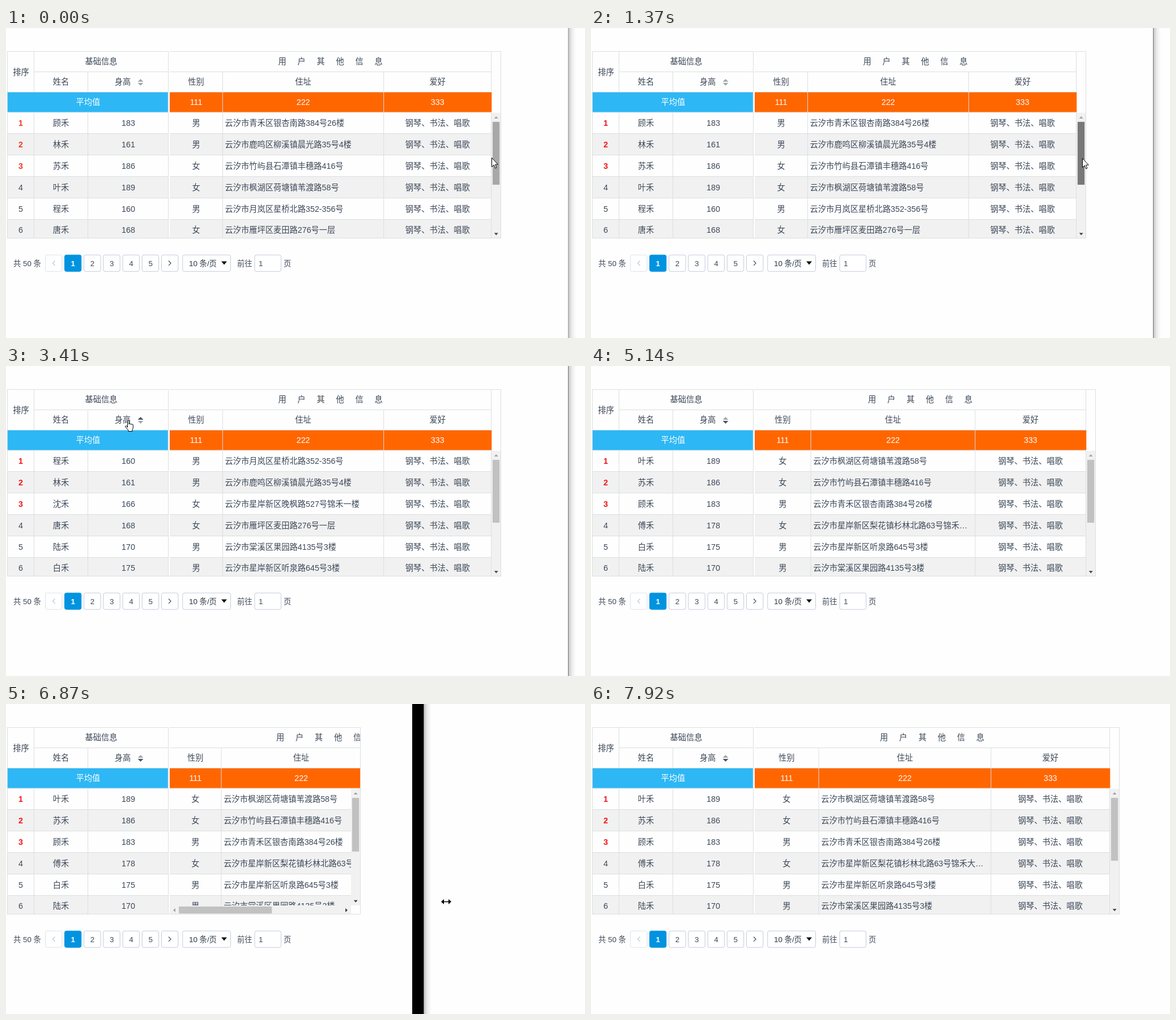
Write an HTML page that moves like this. It is 1022 px wide and 548 px high and loops after 8000 ms.

```html
<!DOCTYPE html>
<html lang="zh-CN">
<head>
<meta charset="utf-8">
<title>表格</title>
<style>
  html, body { margin: 0; width: 100%; height: 100%; overflow: hidden; background: #fefefe; }
  svg { display: block; width: 1022px; height: 548px; }
  text {
    font: 14.25px "Liberation Sans", "Noto Sans CJK SC", "Noto Sans CJK", sans-serif;
    fill: #3c4858; white-space: pre;
  }
  .s { font-size: 13.35px; }
  .w { fill: #fff; }
  .b { font-weight: bold; }
</style>
</head>
<body>
<svg id="stage" viewBox="0 0 1022 548" xmlns="http://www.w3.org/2000/svg"></svg>
<script>
const LOOP = 8000, TOP = 149.5, ROW = 37.8, LEFT = 289, MAX_SCROLL = 155.5, BAR = 16.1;
const BASE = [91.5, 282, 187.5], MIN = 561;
const LINE = '#dcdedf', EM = 14.25;
const HOBBY = '钢琴、书法、唱歌';

const people = [
  ['顾禾', 183, '男', '云汐市青禾区银杏南路384号26楼'],
  ['林禾', 161, '男', '云汐市鹿鸣区柳溪镇晨光路35号4楼'],
  ['苏禾', 186, '女', '云汐市竹屿县石潭镇丰穗路416号'],
  ['叶禾', 189, '女', '云汐市枫湖区荷塘镇苇渡路58号'],
  ['程禾', 160, '男', '云汐市月岚区星桥北路352-356号'],
  ['唐禾', 168, '女', '云汐市雁坪区麦田路276号一层'],
  ['陆禾', 170, '男', '云汐市棠溪区果园路4135号3楼'],
  ['傅禾', 178, '女', '云汐市星岸新区梨花镇杉林北路63号锦禾大厦一楼'],
  ['沈禾', 166, '女', '云汐市星岸新区晚枫路527号锦禾一楼'],
  ['白禾', 175, '男', '云汐市星岸新区听泉路645号3楼']
];

// Each step lists only what changes. cur: kind, x, y; win: content edge, frame edge
const steps = [
  { t: 0, cur: ['arrow', 857, 229], scroll: 0, thumb: '#a8a8a8', order: 0, right: 874, win: [993, 993], line: '#9c9c9c', red: '#f4361a' },
  { t: 330, cur: ['arrow', 862, 285], scroll: 85, thumb: '#787878', line: '#747474' },
  { t: 680, cur: ['arrow', 865, 340], scroll: MAX_SCROLL },
  { t: 1010, cur: ['arrow', 868, 297] },
  { t: 1370, cur: ['arrow', 867, 230], scroll: 0, red: '#f5121a' },
  { t: 1700, cur: ['arrow', 846, 243], thumb: '#c1c1c1' },
  { t: 2050, cur: ['arrow', 253, 126] },
  { t: 2380, cur: ['hand', 219, 97] },
  { t: 2740, cur: ['hand', 227, 90], order: 1 },
  { t: 3080, cur: ['arrow', 212, 125] },
  { t: 3410, cur: ['hand', 210, 96] },
  { t: 3760, cur: ['hand', 233, 90], order: -1 },
  { t: 4100, cur: ['arrow', 973, 327] },
  { t: 4450, cur: ['arrow', 1002, 334] },
  { t: 4800, cur: ['arrow', 988, 328] },
  { t: 5140, cur: null, right: 891, win: null },
  { t: 5520, right: 935 },
  { t: 5840, cur: ['resize', 941, 345], right: 891, win: [976, 976] },
  { t: 6190, cur: ['resize', 781, 345], right: 711, win: [815, 815] },
  { t: 6540, cur: ['resize', 681, 345], right: 611, win: [700, 700] },
  { t: 6870, cur: ['resize', 768, 345], right: 626, win: [717, 738] },
  { t: 7210, cur: ['resize', 921, 345], right: 760, win: [870, 891] },
  { t: 7570, cur: null, right: 909, win: null },
  { t: 7920, right: 933 }
];
const states = [];
steps.forEach(s => states.push({ ...states[states.length - 1], ...s }));

const rect = (x, y, w, h, fill, more = '') =>
  `<rect x="${x}" y="${y}" width="${Math.max(w, 0)}" height="${h}" fill="${fill}" ${more}/>`;
const hline = (x1, x2, y) => rect(x1, y, x2 - x1, 1, LINE);
const vline = (x, y1, y2) => rect(x, y1, 1, y2 - y1, LINE);
const path = (d, fill, more = '') => `<path d="${d}" fill="${fill}" ${more}/>`;
const text = (x, y, str, cls = '', anchor = 'middle', more = '') =>
  `<text x="${x}" y="${y + 5.2}" class="${cls}" text-anchor="${anchor}" ${more}>${str}</text>`;
const clip = (id, x, y, w, h, inner) =>
  `<clipPath id="${id}"><rect x="${x}" y="${y}" width="${w}" height="${h}"/></clipPath><g clip-path="url(#${id})">${inner}</g>`;

// Triangle with its flat side w wide and its tip h away, turned by deg
const tri = (x, y, w, h, deg, fill) =>
  path(`M${-w / 2} ${h / 2}H${w / 2}L0 ${-h / 2}Z`, fill, `transform="translate(${x} ${y}) rotate(${deg})"`);

const charWidth = c => c > '\u00ff' ? EM : c === '-' ? EM * .333 : EM * .556;
const width = str => [...str].reduce((sum, c) => sum + charWidth(c), 0);
function fit(str, room) {
  if (width(str) <= room) return str;
  while (width(str) + EM > room) str = str.slice(0, -1);
  return str + '…';
}

function layout(right) {
  const extra = Math.max(0, right - 17 - LEFT - MIN) / 3;
  const w = BASE.map(b => b + extra);
  const x = [LEFT];
  w.forEach((v, i) => x.push(x[i] + v));
  return { x, w, mid: w.map((v, i) => x[i] + v / 2 - .4), narrow: right < 867 };
}

// Summary cells sit inside the grid lines
const band = (x1, x2, fill) => rect(x1, 113.7, x2 - x1, 34.9, fill);

function leftHead(order) {
  const caret = on => on ? '#48576a' : '#a3a8ae';
  return hline(2, 287, 41) + hline(49, 287, 77) + hline(2, 287, 113) + hline(2, 287, 148.6)
    + vline(2, 41, 149) + vline(49, 41, 113) + vline(144, 77, 113) + vline(286, 41, 149)
    + text(26.5, 77.3, '排序') + text(168, 59, '基础信息') + text(97, 95, '姓名') + text(206, 95, '身高')
    + tri(237.5, 92.5, 10, 5, 0, caret(order > 0)) + tri(237.5, 99.5, 10, 5, 180, caret(order < 0))
    + band(2.8, 285.8, '#2db7f5') + text(145, 131, '平均值', 'w');
}

function rightHead(L, right) {
  const end = L.x[3];
  let out = hline(LEFT, right, 41) + hline(LEFT, end, 77) + hline(LEFT, end, 113) + hline(LEFT, end, 148.6)
    + vline(end - 1, 41, 113);
  [...'用户其他信息'].forEach((c, i) => out += text((LEFT + end) / 2 - .4 + (i - 2.5) * 34, 59, c));
  out += band(LEFT, end + .3, '#ff6600');
  ['性别', '住址', '爱好'].forEach((s, i) => {
    out += text(L.mid[i], 95, s) + text(L.mid[i], 131, String(i + 1).repeat(3), 'w');
    if (i < 2) out += vline(L.x[i + 1] - 1, 77, 149);
  });
  return out;
}

function body(s, L) {
  const rows = [...people];
  if (s.order) rows.sort((a, b) => s.order * (a[1] - b[1]));
  let left = '', main = '';
  const end = L.x[3];
  rows.forEach(([name, height, sex, home], i) => {
    const y = TOP + i * ROW - s.scroll, y0 = Math.round(y), h = Math.round(y + ROW) - y0;
    const mid = y + ROW / 2 - .2, fill = i % 2 ? '#f1f1f1' : '#fefefe';
    left += rect(3, y0, 283, h, fill) + hline(2, 286, y0 + h - 1)
      + text(26, mid, i + 1, i < 3 ? 'b' : '', 'middle', i < 3 ? `style="fill:${s.red}"` : '')
      + text(97, mid, name) + text(216, mid, height);
    main += rect(LEFT, y0, end - LEFT, h, fill) + hline(LEFT, end, y0 + h - 1)
      + text(L.mid[0], mid, sex)
      + text(L.x[1] + 3.7, mid, fit(home, L.w[1] - 8), '', 'start')
      + text(L.mid[2], mid, HOBBY);
  });
  [2, 49, 144, 286].forEach(x => left += vline(x, 149, 371));
  [1, 2, 3].forEach(i => main += vline(L.x[i] - 1, 149, 371));
  const bottom = L.narrow ? 356 : 371;
  return clip('cl', 2, 150, 285, 221, left)
    + clip('cm', LEFT, 150, s.right - 17 - LEFT, bottom - 150, main);
}

function bars(s, L) {
  const x = s.right - 17, top = 149.8, bottom = L.narrow ? 356 : 371.5, view = bottom - top;
  const track = view - 2 * BAR, size = track * view / 378;
  const pos = top + BAR + (track - size) * s.scroll / MAX_SCROLL;
  const tone = off => off ? '#a3a3a3' : '#404040';
  let out = rect(x, top, BAR, view, '#f1f1f1')
    + rect(x + 1.9, pos, 12.3, size, s.thumb)
    + tri(x + 8.2, 158, 7, 4, 0, tone(s.scroll === 0))
    + tri(x + 8.2, bottom - 7.3, 7, 4, 180, tone(s.scroll === MAX_SCROLL));
  if (L.narrow) {
    const w = x - LEFT;
    out += rect(LEFT, 356, w, 15, '#f1f1f1') + rect(x, 356, BAR, 15, '#fefefe')
      + rect(LEFT + BAR, 358, (w - 2 * BAR) * w / MIN, 12.3, '#c1c1c1')
      + tri(LEFT + 8, 364.5, 7, 4, -90, tone(true)) + tri(x - 8, 364.5, 7, 4, 90, tone(false));
  }
  return out;
}

function pager() {
  const box = (x, w, stroke = '#c3ccda', fill = '#fff') =>
    rect(x + .5, 401.2, w - 1, 29.1, fill, `rx="3" stroke="${stroke}"`);
  const chevron = (x, d, stroke) =>
    path(`M${x - 2 * d} 411.5l${4 * d} 4.2l${-4 * d} 4.2`, 'none', `stroke="${stroke}" stroke-width="1.3"`);
  let out = text(13, 415.5, '共 50 条', 's', 'start')
    + box(69, 30.3, '#dce2ea') + chevron(84.5, -1, '#c3c9d1')
    + box(274, 30.3) + chevron(289, 1, '#48576a');
  for (let i = 0; i < 5; i++) {
    const x = 103 + i * 34.2;
    out += i ? box(x, 30.3) : box(x, 30.3, '#0093e0', '#0093e0');
    out += text(x + 15.3, 416, i + 1, i ? 's' : 's b w');
  }
  return out + box(311.3, 85.7) + text(323, 416, '10 条/页', 's', 'start', 'style="fill:#2c3846"')
    + tri(385, 415.5, 10, 6, 180, '#111')
    + text(408, 415.5, '前往', 's', 'start') + box(438.5, 47.5) + text(446, 416, '1', 's', 'start')
    + text(490, 415.5, '页', 's', 'start');
}

const shapes = {
  arrow: path('M.5.5V16.5L4.2 13L6.7 18.9L9 17.9L6.6 12.2H11.3Z', '#fff', 'stroke="#000"'),
  hand: path('M4.5 12.5V1.8q0-1.3 1.3-1.3t1.3 1.3V7q0-1 1.2-1t1.3 1.2q.2-.8 1.2-.8t1.2 1.2q.3-.7 1.1-.7 1.2 0 1.2 1.5V13q0 2-1.5 4v2.5H6V17.5L1 12q-.8-1.2.2-1.9t2 .2Z', '#fff', 'stroke="#000"'),
  resize: path('M0 4.5L5 0V3.7H13V0L18 4.5L13 9V5.3H5V9Z', '#000')
};
const cursor = c => c ? `<g transform="translate(${c[1]} ${c[2]})">${shapes[c[0]]}</g>` : '';

function frame(s) {
  if (!s.win) return '';
  const [inner, outer] = s.win;
  return `<linearGradient id="sh"><stop offset="0" stop-color="#c6c6c6"/><stop offset=".45" stop-color="#ececec"/><stop offset="1" stop-color="#fefefe"/></linearGradient>`
    + rect(inner, 0, outer - inner, 548, '#000')
    + rect(outer, 0, 13, 548, 'url(#sh)') + rect(outer - 1, 0, 1, 548, s.line);
}

function draw(s) {
  const L = layout(s.right);
  return rect(0, 0, 1022, 548, '#fefefe') + leftHead(s.order)
    + clip('ch', LEFT, 41, s.right - LEFT - 1, 109, rightHead(L, s.right))
    + body(s, L) + bars(s, L)
    + hline(2, s.right, 371) + vline(s.right - 1, 41, 372)
    + pager() + frame(s) + cursor(s.cur);
}

const stage = document.getElementById('stage');
const start = performance.now();
let shown = -1;
function tick() {
  const t = (performance.now() - start) % LOOP;
  let i = states.length - 1;
  while (states[i].t > t) i--;
  if (i !== shown) {
    stage.innerHTML = draw(states[i]);
    shown = i;
  }
  requestAnimationFrame(tick);
}
tick();
</script>
</body>
</html>
```
